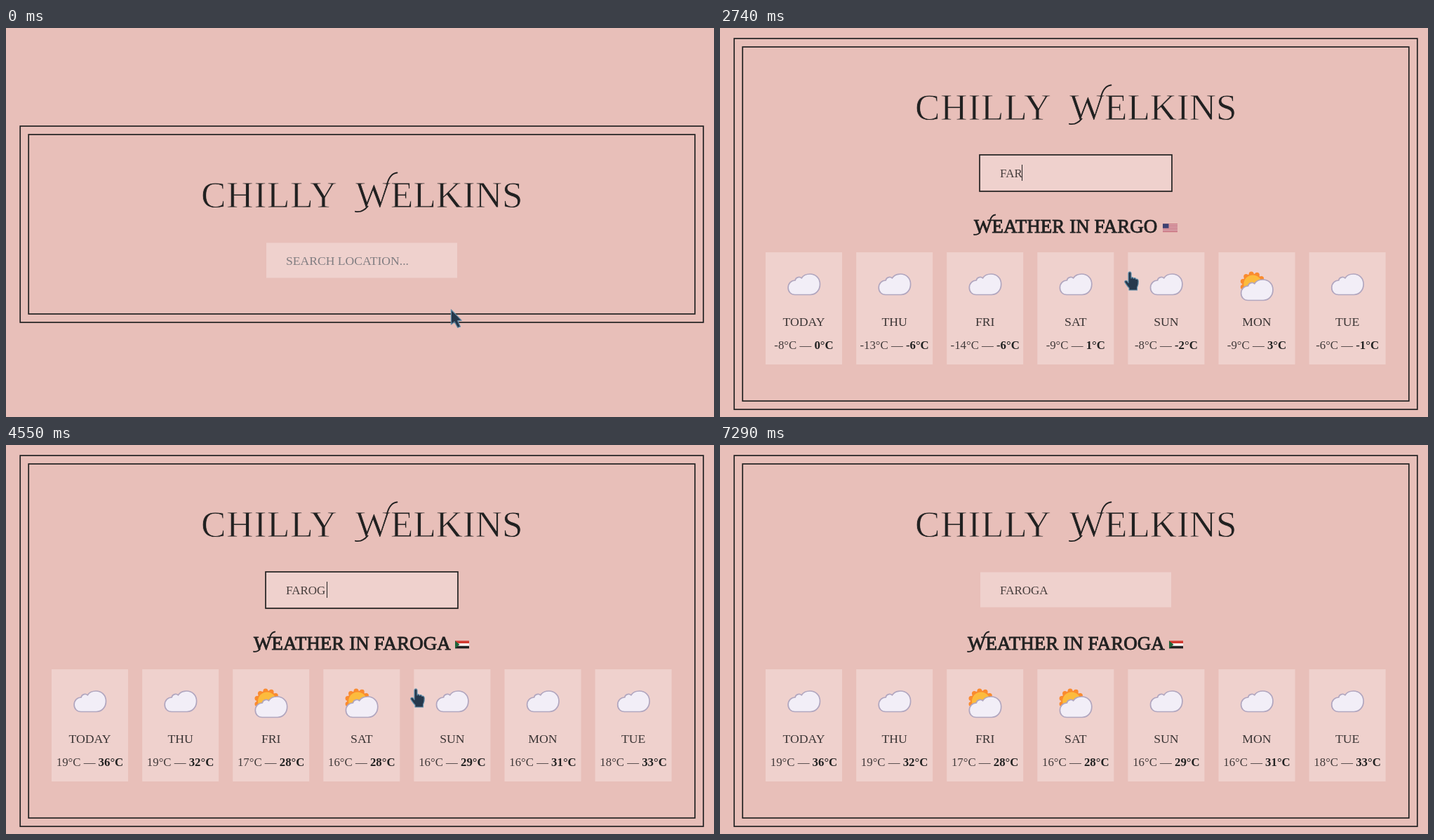
Recreate the animation shown at these times as an HTML page. Size 1009x555 px, loop 7.36 s.

```html
<!DOCTYPE html>
<html lang="en">
<head>
<meta charset="utf-8">
<title>Chilly Welkins</title>
<style>
html, body { margin: 0; width: 100%; height: 100%; overflow: hidden; background: #e8bfb9; }
svg { display: block; width: 1009px; height: 555px; }
text { font-family: "Liberation Serif", "Times New Roman", serif; fill: #212121; }
.line { fill: none; stroke: #212121; stroke-width: 1.7; }
.swash { fill: none; stroke: #212121; stroke-linecap: round; }
.box { fill: #efd1cd; }
.title { font-size: 53px; stroke: #e8bfb9; stroke-width: .8px; }
.heavy { stroke: #212121; stroke-width: .9px; }
.head { font-size: 27px; letter-spacing: .05px; }
.load { font-size: 21px; }
.day { font-size: 17.7px; text-anchor: middle; fill: #3a3434; }
.temp { font-size: 16.8px; text-anchor: middle; fill: #403939; }
.temp tspan { font-weight: bold; fill: #212121; }
.pointer path { fill: #26384c; stroke: #628ea9; stroke-width: 1.2; stroke-linejoin: round; }
</style>
</head>
<body>
<svg viewBox="0 0 1009 555">
  <rect width="1009" height="555" fill="#e8bfb9"/>
  <rect id="outer" class="line" x="20.2" width="973.6"/>
  <rect id="inner" class="line" x="32.2" width="949.6"/>
  <g id="top">
    <text class="title" x="278" y="130.5" letter-spacing=".9">CHILLY</text>
    <text class="title" x="498" y="130.5">WELKINS</text>
    <g id="flourish"></g>
    <rect class="box" x="371" y="181.5" width="272" height="50"/>
    <rect id="focus" class="line" x="370" y="181" width="274" height="52"/>
    <text id="field" x="399" y="213"></text>
    <rect id="caret" y="195" width="1" height="23" fill="#212121"/>
  </g>
  <g id="content"></g>
  <g id="pointer" class="pointer"><path id="shape"/></g>
</svg>
<script>
const $ = id => document.getElementById(id);
const LOOP = 7360, BLACK = '#212121';

const places = {
  Fa: { x: 391, flag: 'pt', sky: 'ccccccc', low: [17, 16, 14, 13, 13, 14, 15], high: [26, 25, 24, 22, 23, 24, 25] },
  Fargo: { x: 362, flag: 'us', sky: 'cccccsc', low: [-8, -13, -14, -9, -8, -9, -6], high: [0, -6, -6, 1, -2, 3, -1] },
  Faro: { x: 373, flag: 'pt', sky: 'ctccccp', low: [16, 14, 13, 11, 13, 12, 15], high: [20, 19, 18, 20, 20, 22, 22] },
  Faroga: { x: 353, flag: 'sd', sky: 'ccssccc', low: [19, 19, 17, 16, 16, 16, 18], high: [36, 32, 28, 28, 29, 31, 33] }
};
const days = ['Today', 'Thu', 'Fri', 'Sat', 'Sun', 'Mon', 'Tue'];

// time, typed text, caret x
const keys = [[0, '', 398], [1210, 'F', 408], [1410, 'FA', 418], [2470, 'FAR', 430],
  [2950, 'FARO', 443], [4330, 'FAROG', 457], [5210, 'FAROGA', 469]];
// time, view, flag loaded
const views = [[0, 'idle'], [1410, 'load'], [1750, 'Fa', 1], [2470, 'load'], [2680, 'Fargo'], [2740, 'Fargo', 1],
  [2950, 'load'], [3010, 'Faro'], [3080, 'Faro', 1], [4330, 'load'], [4480, 'Faroga'], [4550, 'Faroga', 1],
  [5210, 'load'], [5270, 'Faroga', 1]];
const pointers = [[0, 'arrow'], [210, 'beam'], [1480, 'arrow'], [1680, 'hand'], [2470, 'arrow'], [2610, 'hand'],
  [4330, 'arrow'], [4400, 'hand'], [5210, 'arrow'], [5270, 'hand']];
const blinks = [[0, 420], [950, 1210], [1940, 2470], [3470, 4000], [4880, 5210], [5680, 6210], [6740, LOOP]];
// panel top, panel bottom, shift of title and field
const layouts = { idle: [140, 420, 125], load: [109.4, 450.6, 94], full: [15, 544.2, 0] };

const shapes = {
  arrow: 'M-.6 -.2V21L4.2 17.2L8.7 25.5L12.5 24L8.700 15.700L14.200 15.200Z',
  beam: 'M-4 -7.5Q-1 -7.5 0 -6Q1 -7.5 4 -7.5V-6Q1 -6 .8 -4V4Q1 6 4 6V7.5Q1 7.5 0 6Q-1 7.5 -4 7.5V6Q-1 6 -.8 4V-4Q-1 -6 -4 -6Z',
  hand: 'M-2 2C-2 -.8 2 -.8 2 2V9C2.5 7 5 7.5 5.3 9.5C6 8 8.5 8.5 8.8 10.5C10 9.5 12.2 10.5 12.2 13C12.5 18 11.5 20 10.5 22V26H-1V23C-4 20 -5.5 17 -7 15C-8 12.5 -5 11.5 -3.5 13.5L-2 15.5Z'
};

const at = (list, t) => list.filter(e => e[0] <= t).pop();
const rect = (x, y, w, h, fill) => `<rect x="${x}" y="${y}" width="${w}" height="${h}" fill="${fill}"/>`;
const circle = (x, y, r, fill) => `<circle cx="${x}" cy="${y}" r="${r}" fill="${fill}"/>`;
const move = (x, y, body) => `<g transform="translate(${x} ${y})">${body}</g>`;
const ring = (n, draw) => Array.from({ length: n }, (_, i) => draw(i * 2 * Math.PI / n)).join('');
const polar = (x, y, r, a) => [x + r * Math.cos(a), y + r * Math.sin(a)];

// curls added to a capital W of the given size
const curls = (x, y, size, weight) => `<path class="swash" stroke-width="${weight}"
  transform="translate(${x} ${y}) scale(${size})"
  d="M.855 -.63C.9 -.8 .98 -.91 1.12 -.925M.33 -.02C.24 .1 .13 .14 0 .12"/>`;

const cloud = `<path fill="#f2eef7" stroke="#b1a6bf" stroke-width="1.7" d="M-13 15H9C17 15 22.7 8.5 22.7 0
  C22.7 -9 16 -14.5 8.5 -14.5C3 -14.5 -1.5 -12 -3.5 -8.7C-7 -11.5 -12 -9.5 -12.7 -5.5
  C-18 -5.5 -22.7 -1.5 -22.7 5C-22.7 11 -18.5 15 -13 15Z"/>`;
const darkCloud = `<path fill="${BLACK}" stroke="#efd1cd" stroke-width="2" paint-order="stroke"
  d="M-8 12C-15 12 -15 3 -8.5 2.5C-9 -1 -5.5 -2 -4 -.5C-3 -10 10 -11 12.5 -1.5C25 -3 25 12 16 12Z"/>`;

const icons = {
  c: cloud,
  s: ring(11, a => circle(...polar(-6, 0, 14.6, a), 3.5, '#fa8b2f')) + circle(-6, 0, 15, '#fa8b2f') +
    circle(-6, 0, 13, '#fcbb3d') + move(0, 8, cloud),
  t: move(-4.5, -6, darkCloud) + `<path fill="${BLACK}" d="M-1 7.5L-4 12H-1L-2.5 16.5L4 10H1L3 7.5Z"/>`,
  p: circle(-9, -4, 6.5, BLACK) + ring(8, a => {
    const p = polar(-9, -4, 9.5, a), q = polar(-9, -4, 12.8, a);
    return `<path stroke="${BLACK}" stroke-width="2.3" d="M${p}L${q}"/>`;
  }) + darkCloud
};

const flags = {
  us: rect(0, 0, 21, 11.7, '#f1e6e8') + [0, 1, 2, 3, 4, 5, 6].map(i => rect(0, i * 1.8, 21, .95, '#b84658')).join('') +
    rect(0, 0, 8.5, 6.3, '#3d4272'),
  pt: rect(0, 0, 21, 11.7, '#d33434') + rect(0, 0, 8.5, 11.7, '#246b35') + circle(8.5, 5.8, 2.6, '#f0d348'),
  sd: rect(0, 0, 20, 3.7, '#d23b32') + rect(0, 3.7, 20, 3.7, '#fff') + rect(0, 7.4, 20, 3.6, BLACK) +
    '<path fill="#21643a" d="M0 0L6.5 5.5L0 11Z"/>'
};

const degrees = n => `${n}°C`;

function card(place, i) {
  const x = 65 + i * 129.1, mid = x + 54.5;
  return `<rect class="box" x="${x}" y="320" width="109" height="160"/>` +
    move(mid + .3, 365.5, icons[place.sky[i]]) +
    `<text class="day" x="${mid}" y="425">${days[i].toUpperCase()}</text>` +
    `<text class="temp" x="${mid}" y="458">${degrees(place.low[i])} — <tspan>${degrees(place.high[i])}</tspan></text>`;
}

function contentFor(view, flagged) {
  if (view === 'idle') return '';
  if (view === 'load') {
    return '<text class="load heavy" x="451.5" y="380">LOADING...</text>' +
      '<path class="swash" stroke-width="2" d="M453 380C459 379 462 386 471 382.5"/>';
  }
  const place = places[view];
  return `<text class="head heavy" x="${place.x}" y="291.5">WEATHER IN ${view.toUpperCase()}</text>` +
    curls(place.x, 291.5, 27, .07) +
    (flagged ? move(993 - place.x, 279.3, flags[place.flag]) : '') +
    days.map((_, i) => card(place, i)).join('');
}

const overCard = (x, y) => y > 320 && y < 480 && x > 65 && x < 949 && (x - 65) % 129.1 < 109;

function pointerAt(t) {
  const kind = at(pointers, t)[1];
  if (t < 210) {
    const p = [0, .4, .8][Math.floor(t / 70)];
    return [kind, 635 - 51 * p, 402 - 54 * p];
  }
  if (t < 6140) return [kind, 584, 348];
  const p = Math.min(10, Math.floor((t - 6140) / 68.8) + 1) / 10;
  const x = 584 + 440 * p, y = 348 + 225 * p * p;
  return [overCard(x, y) ? 'hand' : 'arrow', x, y];
}

let shown = '';
function render(t) {
  const [, view, flagged] = at(views, t);
  const [top, bottom, shift] = layouts[view] || layouts.full;
  for (const [id, gap] of [['outer', 0], ['inner', 12]]) {
    $(id).setAttribute('y', top + gap);
    $(id).setAttribute('height', bottom - top - 2 * gap);
  }
  $('top').setAttribute('transform', `translate(0 ${shift})`);

  const [, typed, caretX] = at(keys, t);
  $('field').textContent = typed || 'SEARCH LOCATION...';
  $('field').style.fill = typed ? '#453c3b' : '#807d81';
  $('field').style.fontSize = typed ? '17px' : '17.6px';
  $('focus').style.opacity = t < 420 || t >= 7290 ? 0 : t < 490 ? .5 : 1;
  $('caret').setAttribute('x', caretX);
  $('caret').style.opacity = blinks.some(([from, to]) => t >= from && t < to) ? 0 : 1;

  const key = view + flagged;
  if (key !== shown) {
    shown = key;
    $('content').innerHTML = contentFor(view, flagged);
  }

  const [kind, x, y] = pointerAt(t);
  $('shape').setAttribute('d', shapes[kind]);
  $('pointer').setAttribute('transform', `translate(${x} ${y})`);
}

$('flourish').innerHTML = curls(498, 130.5, 53, .037);
const start = performance.now();
function tick() {
  render((performance.now() - start) % LOOP);
  requestAnimationFrame(tick);
}
tick();
</script>
</body>
</html>
```
